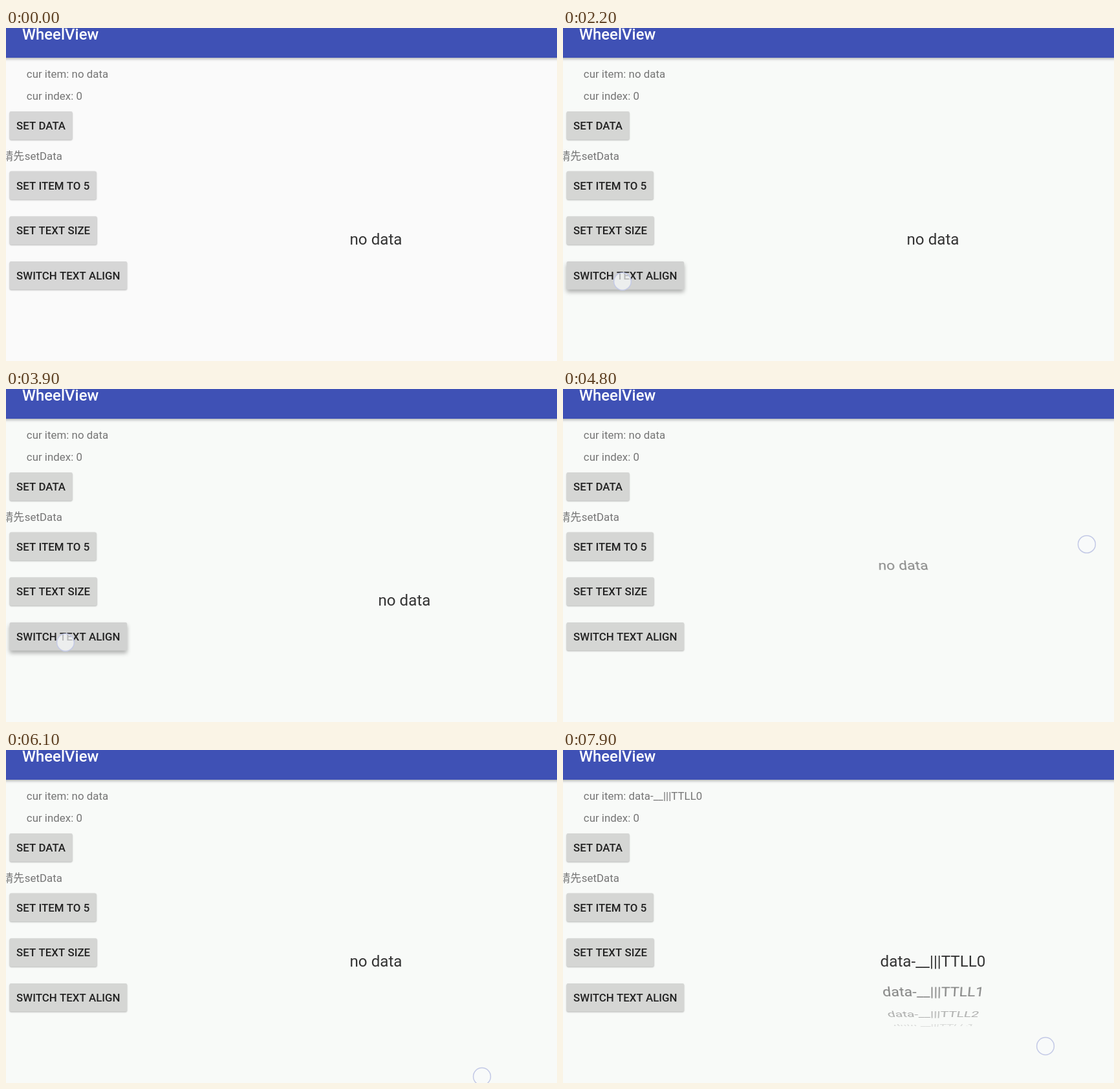
Recreate the animation shown at these times as an HTML page with a canvas. Size 852 by 515 pixels, loop 8 s.

```html
<!DOCTYPE html>
<html lang="en">
<head>
<meta charset="utf-8">
<title>WheelView</title>
<style>
  html, body { margin: 0; width: 100%; height: 100%; overflow: hidden; background: #fafafa; }
  canvas { position: absolute; left: 0; top: 0; }
  #wheel {
    position: absolute; left: 477.5px; top: 311.5px; width: 189px; height: 30px;
    perspective: 185px;
  }
  #wheel div {
    position: absolute; inset: 0; padding: 0 10px;
    font: 24.2px/30px Roboto, sans-serif; white-space: pre;
  }
</style>
</head>
<body>
<canvas id="stage" width="852" height="515"></canvas>
<div id="wheel"><div></div><div></div><div></div><div></div></div>
<script>
const ctx = document.getElementById('stage').getContext('2d');
const wheel = document.getElementById('wheel');
const rows = [...wheel.children];

const LOOP = 8000, TICK = 100;
const RADIUS = 173, STEP = 16.5, MAX_ANGLE = 58;
const PULL = 19.5, SETTLE = 4;
const TOUCH = 3, CLICK = 3;
const TEXT = 16.9, BTN_X = 5.5, BTN_PAD = 10.6, BTN_H = 43.7;

// Gestures: start tick, wheel direction and the finger's place after t ticks
const tap = (at, x, y) => ({ at, dir: 0, place: () => [x, y] });
const tapAlign = at => ({ ...tap(at, 92, 392), align: true });
const flickUp = at => ({
  at, dir: -1,
  place: t => {
    const left = Math.max(0, 1 - t / 2) ** 3;
    return [819 - 73 * left, 209 + 249 * left];
  }
});
const flickDown = at => ({ at, dir: 1, place: t => [793 - 25.5 * t, 181 + 133 * t] });

const setData = tap(71, 45, 161);
const gestures = [
  flickUp(6), flickDown(15), tapAlign(22),
  flickUp(29), flickDown(33), tapAlign(37),
  flickUp(47), flickDown(51), tapAlign(55),
  tap(61, 736, 505), flickUp(63), flickDown(65), tap(68, 762, 517),
  setData, tap(79, 746, 458)
];

const buttons = ['SET DATA', 'SET ITEM TO 5', 'SET TEXT SIZE', 'SWITCH TEXT ALIGN']
  .map((label, i) => ({ label, y: i ? 151.8 + 69.7 * i : 129 }));

function wheelAngle(k) {
  return gestures.reduce((sum, { at, dir }) => {
    const u = Math.min(1, Math.max(0, (k - at) / SETTLE));
    return sum + dir * PULL * Math.sin(Math.PI * u ** 0.6);
  }, 0);
}

function alignment(k) {
  const clicks = gestures.filter(g => g.align && k >= g.at + CLICK).length;
  return ['center', 'right', 'left'][clicks % 3];
}

function setFont(size, weight) {
  ctx.font = `${weight} ${size}px Roboto, "Noto Sans CJK SC", "Noto Sans CJK", sans-serif`;
}

function text(str, x, y, color, size = TEXT, weight = 400) {
  setFont(size, weight);
  ctx.fillStyle = color;
  ctx.fillText(str, x, y);
}

function shadow(alpha, blur, dy) {
  ctx.shadowColor = `rgba(0,0,0,${alpha})`;
  ctx.shadowBlur = blur;
  ctx.shadowOffsetY = dy;
}

function isPressed(btn, w, k) {
  return gestures.some(({ at, place }) => {
    const [x, y] = place(0);
    return k >= at && k <= at + CLICK && x < BTN_X + w && y > btn.y && y < btn.y + BTN_H;
  });
}

function drawButton(btn, k) {
  setFont(TEXT, 500);
  const w = ctx.measureText(btn.label).width + 2 * BTN_PAD;
  const down = isPressed(btn, w, k);
  ctx.save();
  if (down) shadow(0.3, 6, 4);
  else shadow(0.26, 2, 1);
  ctx.fillStyle = down ? '#d1d2d1' : k < 6 ? '#d6d6d6' : '#d5d6d4';
  ctx.beginPath();
  ctx.roundRect(BTN_X, btn.y, w, BTN_H, 2.4);
  ctx.fill();
  ctx.restore();
  text(btn.label, BTN_X + BTN_PAD, btn.y + 28.2, '#212121', TEXT, 500);
}

function drawTouch(k) {
  const g = gestures.findLast(({ at }) => k >= at && k < at + TOUCH);
  if (!g) return;
  ctx.beginPath();
  ctx.arc(...g.place(k - g.at), 13.4, 0, Math.PI * 2);
  ctx.fillStyle = 'rgba(248,249,251,.7)';
  ctx.fill();
  ctx.strokeStyle = '#c3c9e6';
  ctx.lineWidth = 1.5;
  ctx.stroke();
}

function drawScreen(k, loaded) {
  ctx.fillStyle = k < 6 ? '#fafafa' : '#f8faf8';
  ctx.fillRect(0, 0, 852, 515);

  ctx.save();
  shadow(0.28, 4, 1.5);
  ctx.fillStyle = '#3f51b5';
  ctx.fillRect(-10, -10, 872, 56);
  ctx.restore();
  text('WheelView', 25, 18, '#fff', 23.9, 500);

  const grey = '#757575';
  text('cur item: ' + (loaded ? 'data-__|||TTLL0' : 'no data'), 31.8, 76.7, grey);
  text('cur index: 0', 31.8, 111.2, grey);
  text('请先', -5.6, 203.7, grey);
  text('setData', 28.8, 203.7, grey);

  for (const btn of buttons) drawButton(btn, k);
  drawTouch(k);
}

function drawWheel(k, loaded) {
  const side = alignment(k);
  const base = wheelAngle(k);
  wheel.style.perspectiveOrigin = side + ' center';
  rows.forEach((row, i) => {
    const angle = base + i * STEP;
    const away = Math.abs(angle);
    const s = row.style;
    row.textContent = loaded ? 'data-__|||TTLL' + i : i ? '' : 'no data';
    s.textAlign = side;
    s.visibility = away < MAX_ANGLE ? 'visible' : 'hidden';
    s.color = away < 6 ? '#333' : '#555';
    s.opacity = away < 6 ? 1 : 1 - away / 62;
    s.transform = away < 0.01 ? 'none'
      : `translateZ(${-RADIUS}px) rotateX(${-angle}deg) translateZ(${RADIUS}px)`;
  });
}

let last = -1;
function frame(now) {
  const k = Math.floor(now % LOOP / TICK);
  if (k !== last) {
    last = k;
    const loaded = k >= setData.at + CLICK;
    drawScreen(k, loaded);
    drawWheel(k, loaded);
  }
  requestAnimationFrame(frame);
}
requestAnimationFrame(frame);
</script>
</body>
</html>
```
